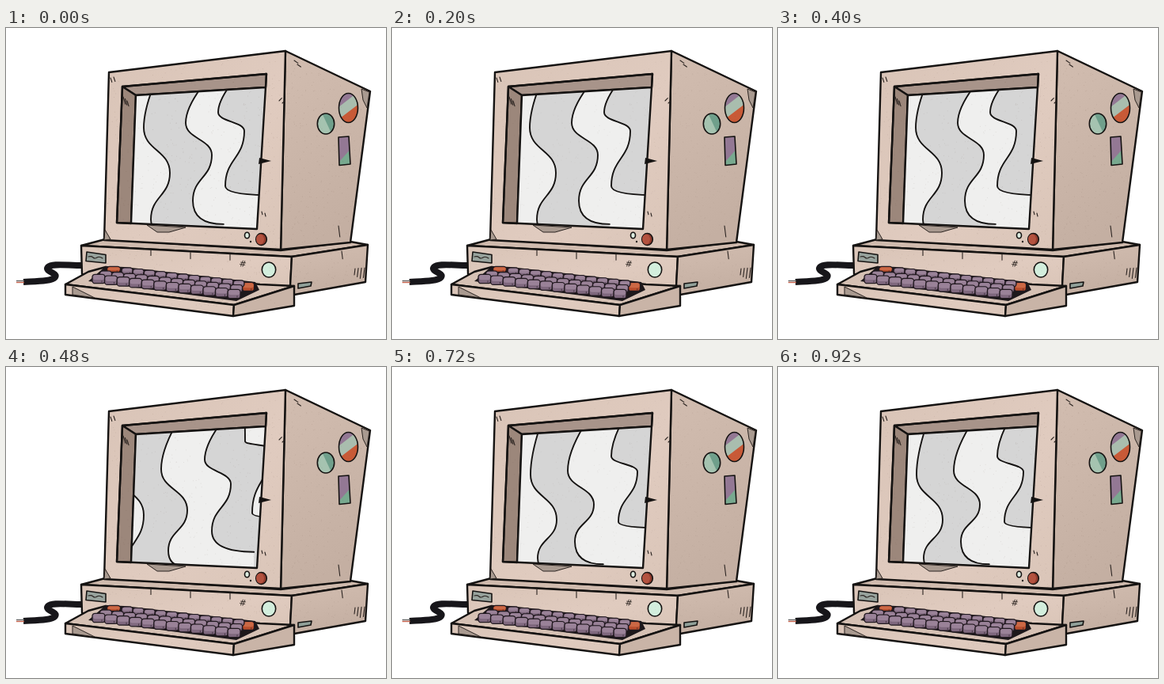
Animation, 480 px wide and 393 px high, one loop 0.96 s. Source, as an HTML page:

```html
<!DOCTYPE html>
<html lang="en">
<head>
<meta charset="utf-8">
<title>Old computer</title>
<style>
  html, body { margin: 0; width: 100%; height: 100%; overflow: hidden; background: #fff; }
  svg { display: block; width: 100%; height: 100%; }
  .ink { stroke: #151312; stroke-width: 2.4; stroke-linejoin: round; stroke-linecap: round; }
  .mid { stroke-width: 1.6; }
  .thin { fill: none; stroke: #2a2320; stroke-width: 1.1; stroke-linecap: round; }
  .patch { fill: #a99a90; stroke: #2a2320; stroke-linejoin: round; }
</style>
</head>
<body>
<svg viewBox="0 0 480 393" preserveAspectRatio="none">
  <defs>
    <linearGradient id="front" x2="1" y2="1">
      <stop stop-color="#d9c4b7"/><stop offset=".6" stop-color="#e0cbbf"/><stop offset="1" stop-color="#dac5b8"/>
    </linearGradient>
    <linearGradient id="side" x2=".3" y2="1">
      <stop stop-color="#d2bdb0"/><stop offset="1" stop-color="#c4afa2"/>
    </linearGradient>
    <clipPath id="glass"><path d="M164 85L328 75L317 254L158 247Z"/></clipPath>
    <clipPath id="shell"><path d="M130 56L353 29L460 80L435 271L457 274L454 321L364 337V351L287 364L75 337V324L96 310L95 275L125 268Z"/></clipPath>
    <clipPath id="badge"><ellipse cx="432.500" cy="101" rx="12" ry="18.500"/></clipPath>
    <clipPath id="dot"><ellipse cx="404" cy="121" rx="10.700" ry="13"/></clipPath>
    <clipPath id="tag"><path d="M420 138L433 137L435 172L421 173.500Z"/></clipPath>
  </defs>

  <!-- cable -->
  <path d="M97 300C76 300 58 297 53 302C48 308 66 309 62 315C58 320 40 320 22 321" fill="none" stroke="#17161a" stroke-width="8"/>
  <path d="M23 319.500H13" stroke="#666" stroke-width="1.400"/>
  <path d="M23 321.500H13" stroke="#c4614b" stroke-width="1.400"/>

  <!-- base and monitor -->
  <g class="ink">
    <path fill="#d0bbae" d="M95 275L125 267L347 281L435 270L457 274L361 289Z"/>
    <path fill="url(#front)" d="M95 275L361 289L359 327L96 311Z"/>
    <path fill="url(#side)" d="M361 289L457 274L454 321L364 337L359 326Z"/>
    <path fill="url(#side)" d="M353 29L460 80L435 271L347 280Z"/>
    <path fill="url(#front)" d="M130 56L353 29L347 280L124 268Z"/>
    <path fill="#a8948a" d="M147 74L329 58L328 75L164 85Z"/>
    <path fill="#9c877b" d="M147 74L164 85L158 247L140 246Z"/>
  </g>

  <!-- screen -->
  <g clip-path="url(#glass)">
    <path fill="#efefee" d="M140 55H340V265H140Z"/>
    <path id="bands" fill="#d5d5d5" fill-rule="evenodd"/>
    <path id="lines" class="ink" fill="none" style="stroke-width:1.900"/>
  </g>
  <path class="ink" fill="none" d="M147 74L329 58L317 254L140 246ZM158 247L164 85L328 75"/>

  <!-- wear -->
  <path class="patch" d="M178 249L191 258H206L227 252Z"/>
  <path class="patch" d="M449 77L459 81L456 101L451 91Z"/>
  <path class="patch" d="M125 255L132 267L124 268Z"/>
  <path fill="#151312" d="M320 164L335 168L319 172Z"/>
  <text x="294" y="301" font-family="DejaVu Sans, sans-serif" font-size="11" fill="#2a2320" transform="rotate(8 294 301)">#</text>

  <!-- stickers -->
  <g clip-path="url(#badge)">
    <path fill="#937894" d="M418 80H447V122H418Z"/>
    <path d="M414 113L450 85" stroke="#a9bdae" stroke-width="13"/>
    <path fill="#c85a37" d="M418 117L447 95V124H418Z"/>
  </g>
  <g clip-path="url(#dot)">
    <path fill="#a5c3b0" d="M390 105H418V137H390Z"/>
    <path fill="#6f9f8b" d="M398 105H418V130L411 133Z"/>
  </g>
  <g clip-path="url(#tag)">
    <path fill="#937894" d="M418 135H437V175H418Z"/>
    <path fill="#78a98f" d="M419 171L437 151V176H419Z"/>
  </g>
  <g class="ink mid" fill="none">
    <ellipse cx="432.500" cy="101" rx="12" ry="18.500"/>
    <ellipse cx="404" cy="121" rx="10.700" ry="13"/>
    <path d="M420 138L433 137L435 172L421 173.500Z"/>
  </g>

  <!-- buttons and plates -->
  <g class="ink mid">
    <ellipse cx="304.500" cy="262" rx="3" ry="3.800" fill="#dcebdf"/>
    <ellipse cx="322.500" cy="267" rx="6.800" ry="7.500" fill="#8f3b2d"/>
    <ellipse cx="321" cy="267" rx="5" ry="6.500" fill="#b3523f" stroke="none"/>
    <circle cx="309" cy="270" r=".4"/>
    <ellipse cx="332" cy="305.500" rx="8.700" ry="9.500" fill="#d3eedd"/>
    <path fill="#98a39d" d="M102 283L126 286.500V297L101 294.500Z"/>
    <path fill="#90a099" d="M369 323L386 321L385 326L369 329Z"/>
  </g>
  <path class="thin" d="M104 289q4-1 6 1t5 0t7 1"/>

  <!-- keyboard -->
  <g class="ink">
    <path fill="#d6c1b4" d="M75 324L104 308L126 302L321 324L364 326L288 350Z"/>
    <path fill="url(#front)" d="M75 324L288 350L287 364L75 337Z"/>
    <path fill="#c9b4a7" d="M288 350L364 326V351L287 364Z"/>
  </g>
  <path class="patch" d="M84 327L98 334L112 341L84 337Z"/>
  <path fill="#1d181b" d="M104 320L126 301L150 302L315 321L320 331L291 345Z"/>
  <g id="keys"></g>

  <path id="scratches" class="thin"/>
  <path id="grain" clip-path="url(#shell)" fill="none" stroke="#50382c" stroke-opacity=".16" stroke-width=".8"/>
</svg>

<script>
const FRAME = 40, COUNT = 24;
const $ = id => document.getElementById(id);
const mix = (a, b, u) => a + (b - a) * u;

function random(seed) {
  return () => (seed = seed * 16807 % 2147483647) / 2147483647;
}

// One wavy edge whose first bend is at x; the bends rise towards the right.
function edge(x, dy) {
  const u = (x - 174) / 100, r = Math.max(0, u);
  const top = x + 12 + 34 * r * (1 - r);
  const y1 = 130 - 22 * r * r + dy;
  const y2 = 187 - 58 * r ** 1.5 + dy;
  const y3 = 242 - 45 * u;
  const endX = x + 16 + 60 * u, endY = Math.max(y3 + 8, 252 - 52 * r ** 4);
  const bend = (xa, ya, xb, yb) => {
    const m = (ya + yb) / 2;
    return `C${xa} ${m} ${xb} ${m} ${xb} ${yb}`;
  };
  const line = `M${top} 74Q${x} ${mix(74, y1, .6)} ${x} ${y1}`
    + bend(x, y1, x + 33, y2)
    + bend(x + 33, y2, x + 9, y3)
    + `Q${x + 9} ${endY} ${endX} ${endY}`;
  return { line, area: `${line}V270H345V55H${top}Z` };
}

// Three drawings: the edges, and how far their bends sit up or down.
const poses = [
  { edges: [174, 227, 268], dy: -4 },
  { edges: [141, 196, 251, 302], dy: 0 },
  { edges: [175, 222, 277], dy: 6 }
].map(({ edges, dy }) => {
  const curves = edges.map(x => edge(x, dy));
  return {
    lines: curves.map(c => c.line).join(''),
    bands: curves.map(c => c.area).join('')
  };
});

function key(x, y, w, h, hot) {
  const [top, low] = hot ? ['#cc6845', '#b94e2d'] : ['#9a8298', '#7f687e'];
  return `<g transform="translate(${x - w / 2} ${y - h / 2})">
    <rect width="${w}" height="${h}" rx="3.5" fill="${low}" stroke="#21191f" stroke-width="1.3"/>
    <rect x="1.2" y=".7" width="${w - 2}" height="${h * .55}" rx="2.5" fill="${top}"/>
    <path d="M${w * .75} ${h * .7}v${h / 5}" stroke="#2c222a" stroke-width=".7"/></g>`;
}

// Three rows from back to front, growing and spreading.
let keys = key(136, 305, 17, 7, true) + key(306, 327, 15, 11, true);
for (let r = 0; r < 3; r++) {
  const n = r ? 12 : 11, left = r ? 135 - r * 9 : 153;
  for (let i = 0; i < n; i++) {
    const u = i / (n - 1);
    keys += key(mix(left, 294 - r * 3, u), mix(307 + r * 5, 323 + r * 6.5, u), 14 + r, 8 + r * 1.7);
  }
}
$('keys').innerHTML = keys;

const rnd = random(71);

// Short strokes of uneven length along a line.
function ticks(n, x0, y0, x1, y1, dx, dy) {
  let d = '';
  for (let i = 0; i < n; i++) {
    const u = n > 1 ? i / (n - 1) : 0, s = mix(.5, 1, rnd());
    d += `M${mix(x0, x1, u)} ${mix(y0, y1, u)}l${dx * s} ${dy * s}`;
  }
  return d;
}
$('scratches').setAttribute('d',
  ticks(4, 441, 304, 453, 303, -2, 16) +
  ticks(3, 148, 87, 153, 92, 3, 10) +
  ticks(2, 132, 63, 136, 62, 3, 9) +
  ticks(2, 364, 41, 368, 46, 7, 5) +
  ticks(2, 323, 232, 327, 234, 1, 4) +
  ticks(3, 183, 281, 283, 286, 0, 9) +
  ticks(2, 345, 92, 349, 95, 4, -4) +
  ticks(2, 424, 282, 420, 250, 2, 16));

let specks = '';
for (let i = 0; i < 1500; i++) {
  specks += `M${mix(60, 470, rnd()).toFixed(1)} ${mix(20, 370, rnd()).toFixed(1)}h.8`;
}
$('grain').setAttribute('d', specks);

let shown = -1;
function draw(now) {
  const n = Math.floor(now / FRAME) % COUNT;
  if (n === shown) return;
  shown = n;
  // Fifteen drawings are spread over the loop, cycling through the poses.
  const pose = poses[Math.max(0, Math.ceil(n * 15 / COUNT) - 1) % poses.length];
  $('bands').setAttribute('d', pose.bands);
  $('lines').setAttribute('d', pose.lines);
  $('grain').setAttribute('stroke-dashoffset', n);
  $('grain').setAttribute('stroke-dasharray', '.8 .3');
}

const start = performance.now();
function tick() {
  draw(performance.now() - start);
  requestAnimationFrame(tick);
}
tick();
</script>
</body>
</html>
```
